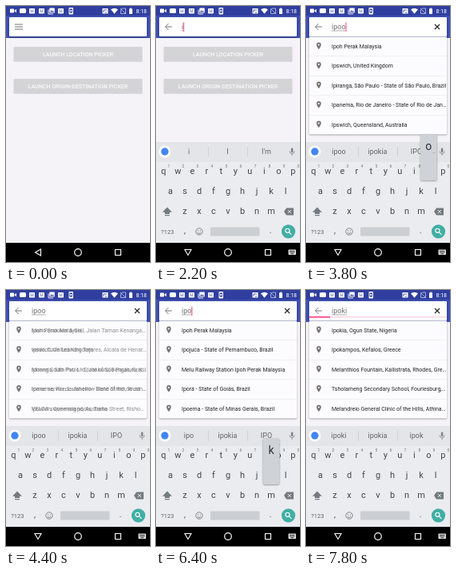
An HTML page with a canvas that plays this animation: 180 px wide and 320 px high, repeating every 8000 ms.

```html
<!DOCTYPE html>
<html lang="en">
<head>
<meta charset="utf-8">
<title>Location picker</title>
<style>
  html, body { margin: 0; width: 100%; height: 100%; overflow: hidden; background: #f5f3f7; }
  canvas { display: block; width: 180px; height: 320px; }
</style>
</head>
<body>
<canvas id="stage"></canvas>
<script>
const LOOP = 8000, TICK = 200;
const PINK = '#ff4081', INK = '#41474b', KEY = '#747b80', GREY = '#757575';
const canvas = document.getElementById('stage');
const ctx = canvas.getContext('2d');
const ratio = window.devicePixelRatio || 1;
canvas.width = 180 * ratio;
canvas.height = 320 * ratio;

const places = {
  ip: ['Ipoh Perak Malaysia', 'Ipswich, United Kingdom',
    'Ipiranga, São Paulo - State of São Paulo, Brazil',
    'Ipanema, Rio de Janeiro - State of Rio de Janeiro, Brazil', 'Ipswich, Queensland, Australia'],
  ipoo: ['Marlo Snooker & Grill, Jalan Taman Kenanga, Pluit',
    'veldo, Calle Leandro Tejares, Alcala de Henares, Spain',
    'Morvel South Pvt. Ltd., Jakkuru, Bengaluru, Karnataka',
    'lomar service, Larkhollow Bend Street, West Miami, FL',
    'VELDA swimming pools, Tamo Street, Rishon LeZion'],
  ipo: ['Ipoh Perak Malaysia', 'Ipojuca - State of Pernambuco, Brazil',
    'Melu Railway Station Ipoh Perak Malaysia', 'Iporá - State of Goiás, Brazil',
    'Ipoema - State of Minas Gerais, Brazil'],
  ipok: ['Ipokia, Ogun State, Nigeria', 'Ipokampos, Kefalos, Greece',
    'Melanthios Fountain, Kallistrata, Rhodes, Greece',
    'Tsholameng Secondary School, Fouriesburg, South Africa',
    'Melandreio General Clinic of the Hills, Athina, Greece']
};

// Each step changes part of the state from its time on.
const steps = [
  [0, { open: 0, keys: 0, drop: 0, text: '', words: ['and', 'I', 'please'], cursor: 0, clear: 0,
        popup: '', list: '', next: '', fade: 0, unfold: 0, search: -1 }],
  [800, { open: .5, cursor: 1 }],
  [1000, { open: 1, keys: .7, drop: 12.5 }],
  [1200, { keys: 1, drop: 0 }],
  [1800, { popup: 'i' }],
  [2000, { text: 'i', words: ['i', 'I', "I'm"] }],
  [2200, { popup: '' }],
  [2600, { cursor: 0, clear: 1 }],
  [3200, { text: 'ip', words: ['ip', 'IP', 'up'], popup: 'p', cursor: 1 }],
  [3400, { popup: '', list: 'ip', unfold: .6 }],
  [3600, { text: 'ipo', words: ['ipo', 'ipokia', 'IPO'], popup: 'o', unfold: 1 }],
  [3800, { text: 'ipoo', words: ['ipoo', 'ipokia', 'IPO'] }],
  [4000, { popup: '' }],
  [4400, { next: 'ipoo', fade: .5, cursor: 0 }],
  [4600, { list: 'ipoo', fade: 0, cursor: 1 }],
  [5000, { cursor: 0 }],
  [5400, { text: 'ipo', words: ['ipo', 'ipokia', 'IPO'], cursor: 1 }],
  [5800, { search: 5600, cursor: 0 }],
  [6000, { next: 'ipo', fade: .5 }],
  [6200, { list: 'ipo', fade: 0, search: -1, cursor: 1 }],
  [6400, { popup: 'k' }],
  [6600, { text: 'ipok', words: ['ipok', 'ipokia', 'ipo'] }],
  [6800, { popup: '' }],
  [7000, { search: 6800 }],
  [7200, { popup: 'i' }],
  [7400, { text: 'ipoki', words: ['ipoki', 'ipokia', 'ipok'] }],
  [7600, { popup: '', search: -1, next: 'ipok', fade: .5 }],
  [7800, { list: 'ipok', fade: 0, search: 7600, cursor: 0 }]
];
const stateAt = t => Object.assign({}, ...steps.filter(s => s[0] <= t).map(s => s[1]));

function rect(x, y, w, h, color, r = 0) {
  ctx.fillStyle = color;
  ctx.beginPath();
  ctx.roundRect(x, y, w, h, r);
  ctx.fill();
}
function disc(x, y, r, color) {
  ctx.fillStyle = color;
  ctx.beginPath();
  ctx.arc(x, y, r, 0, 7);
  ctx.fill();
}
function fill(d, color) {
  ctx.fillStyle = color;
  ctx.fill(new Path2D(d));
}
function line(d, color, w = 1) {
  ctx.strokeStyle = color;
  ctx.lineWidth = w;
  ctx.stroke(new Path2D(d));
}
function label(str, x, y, size, color, align = 'left', weight = 400) {
  ctx.font = `${weight} ${size}px Roboto, sans-serif`;
  ctx.fillStyle = color;
  ctx.textAlign = align;
  ctx.fillText(str, x, y);
}
function raised(blur, draw) {
  ctx.save();
  ctx.shadowColor = 'rgba(0,0,0,.4)';
  ctx.shadowBlur = blur * ratio;
  ctx.shadowOffsetY = .7 * ratio;
  draw();
  ctx.restore();
}
function clipped(x, y, w, h, draw) {
  ctx.save();
  ctx.beginPath();
  ctx.rect(x, y, w, h);
  ctx.clip();
  draw();
  ctx.restore();
}
function ellipsis(str, width) {
  if (ctx.measureText(str).width <= width) return str;
  while (ctx.measureText(str + '…').width > width) str = str.slice(0, -1);
  return str + '…';
}

function statusBar() {
  const blue = '#303f9f';
  rect(0, 0, 180, 12, blue);
  rect(5, 3.5, 5, 5, '#fff', .7);
  fill('M10 6l3-2.3v4.6z', '#fff');
  rect(17, 3, 8, 6, '#fff', 1.5);
  for (const x of [29, 41]) {
    rect(x, 3, 7, 6.5, '#fff', .7);
    line(`M${x + 1.5} 5h1.5m1 0h1.5M${x + 1.5} 7h4`, blue, .8);
  }
  line('M53 4.5v5.5h6', '#fff', .9);
  rect(54.3, 2.5, 6.5, 6, '#fff', .5);
  fill('M55 7.5l1.7-2.2 1.2 1.4 .9-1 1.4 1.8z', blue);
  rect(65, 3, 7, 6.5, '#fff', .7);
  line('M66.5 5h1.5m1 0h1.5M66.5 7h4', blue, .8);
  rect(78.5, 2, 5.5, 8.5, '#fff', .8);
  rect(79.5, 3.5, 3.5, 5, blue);
  rect(80.3, 5, 2, 2, '#fff');
  rect(120.5, 3, 7, 6.5, '#fff', .5);
  line('M122 8V5h4M124 8h2', blue, .8);
  fill('M131 4.3q4.5-3 9 0l-4.5 5.4z', '#fff');
  line('M143.5 9.5V5l2-2h4v6.5zM143 3l7 7', '#c5cae9', .8);
  rect(154, 3.2, 4, 6.8, '#fff', .5);
  rect(155.2, 2.4, 1.6, 1, '#fff');
  label('8:18', 176, 9, 7, '#fff', 'right');
}

function page() {
  rect(0, 0, 180, 320, '#f5f3f7');
  rect(0, 12, 180, 28, '#3f51b5');
  statusBar();
  ['LOCATION', 'ORIGIN-DESTINATION'].forEach((kind, i) => {
    rect(9.5, 51 + 40 * i, 161, 18.7, '#d4d4d6', 1);
    label(`LAUNCH ${kind} PICKER`, 90, 62.8 + 40 * i, 7, '#fafafa', 'center', 500);
  });
}

function menuIcon(k) {
  const mix = (a, b) => a + (b - a) * k;
  for (const side of [-1, 1])
    line(`M${mix(11, 11.6)} ${26 + side * mix(3, 0)}L${mix(21, 15.6)} ${26 + side * mix(3, 4)}`, GREY);
  line(`M${mix(11, 12)} 26H${mix(21, 19.8)}`, GREY);
}

function searchCard(s, t) {
  raised(2.5, () => rect(4, 14, 172, 24, '#fff', 1));
  menuIcon(s.open);
  if (!s.open) return;
  label(s.text || 'Search', 32, 29.2, 9, s.text ? '#727272' : '#828282');
  const end = 32 + (s.text ? ctx.measureText(s.text).width : 0);
  if (s.text) rect(32, 30.6, end - 32, .7, '#888');
  if (s.cursor) rect(end, 20.5, 1, 11.5, PINK);
  if (s.clear) line('M161 23l6 6m0-6l-6 6', '#222', 1.2);
  if (s.search >= 0) {
    const k = (t - s.search) / 200;
    const head = Math.min(176, 4 + 26 * k * k), tail = 4 + 34 * (k - 1) ** 2;
    rect(4, 33, 172, 1.6, '#ffd6e3');
    rect(tail, 33, head - tail, 1.6, PINK);
  }
}

function rows(name) {
  places[name].forEach((place, i) => {
    ctx.font = '400 7px Roboto, sans-serif';
    label(ellipsis(place, 143.6), 32, 52.7 + 24.5 * i, 7, '#222');
  });
}

function results(s) {
  if (!s.list) return;
  const height = 122 * s.unfold;
  raised(2, () => rect(4, 38.5, 172, height, '#fcfbfd', 1));
  clipped(4, 38, 172, height + .5, () => {
    rect(4, 38, 172, .6, '#dcdcdf');
    for (let i = 0; i < 5; i++) {
      const y = 50 + 24.5 * i;
      if (i) rect(4, y - 12, 172, .5, '#e6e6e9');
      fill(`M16 ${y - 4.4}a2.8 2.8 0 0 0-2.8 2.8c0 2.2 2.8 5.7 2.8 5.7s2.8-3.5 2.8-5.7a2.8 2.8 0 0 0-2.8-2.8z`, GREY);
      disc(16, y - 1.6, 1, '#fff');
    }
    ctx.globalAlpha = 1 - s.fade;
    rows(s.list);
    if (s.fade) {
      ctx.globalAlpha = s.fade;
      rows(s.next);
    }
  });
}

function navIcons(typing) {
  line(typing ? 'M36 304.5h8l-4 7z' : 'M43.5 304v8l-7-4z', '#fff', 1.1);
  line('M94.3 308a4.3 4.3 0 1 1-8.6 0a4.3 4.3 0 1 1 8.6 0z', '#fff', 1.2);
  line('M136.5 304.5h7v7h-7z', '#fff', 1.1);
  if (typing) {
    rect(165.5, 304.5, 9.5, 6.5, '#ddd', .7);
    line('M167 306.3h6.5M167 308h6.5', '#000', .7);
    line('M168.5 309.7h3.5', '#000', .7);
  }
}

const keyRows = [['qwertyuiop', 9.3, 210], ['asdfghjkl', 18, 235], ['zxcvbnm', 36, 260]];

function keys(s) {
  disc(11, 182, 7.5, '#fff');
  disc(11, 182, 4.7, '#4285f4');
  s.words.forEach((word, i) => label(word, 41 + 48.5 * i, 185, 9, '#5f6569', 'center'));
  for (const x of [65, 114]) rect(x, 176, .6, 12.5, '#c1c3c7');
  rect(168.8, 177.5, 2.6, 5.8, '#80868a', 1.3);
  line('M167 181.5a3.1 3.1 0 0 0 6.2 0M170.1 184.6v2.4', '#80868a', .8);

  for (const [letters, x, y] of keyRows)
    [...letters].forEach((c, i) => label(c, x + 18 * i, y, 11, INK, 'center'));
  for (let i = 0; i < 10; i++) label((i + 1) % 10, 16 + 18 * i, 202, 5, '#6d7479', 'center');

  fill('M14 251.5l6 6.2h-3v2.3h-6v-2.3h-3z', KEY);
  rect(11, 261, 6, 1.2, KEY);
  fill('M160 257l3-4.5h9v9h-9z', KEY);
  line('M164.8 255l4 4m0-4l-4 4', '#ebecf0', 1);
  label('?123', 14.3, 284.6, 7.5, '#5c6368', 'center');
  label(',', 36, 284, 10, INK, 'center');
  line('M58.2 282a4.2 4.2 0 1 1-8.4 0a4.2 4.2 0 1 1 8.4 0zM51.8 283a2.3 2 0 0 0 4.4 0', KEY, .9);
  disc(52.6, 280.9, .6, KEY);
  disc(55.4, 280.9, .6, KEY);
  rect(68, 276.5, 61.5, 11, '#cbced2', 1);
  label('.', 143, 284, 10, INK, 'center');
  disc(165.5, 281.8, 8.6, '#42aea4');
  line('M167 280.8a2.6 2.6 0 1 1-5.2 0a2.6 2.6 0 1 1 5.2 0zM166.4 282.8l3 3', '#fff', 1.1);
}

function keyPopup(letter) {
  const [letters, x0, base] = keyRows.find(r => r[0].includes(letter));
  const x = x0 + 18 * letters.indexOf(letter), top = base - 49.5;
  const left = Math.min(x - 10.3, 159);
  raised(2, () => rect(left, top, 20.6, 57.5, '#cfd3d7', 2));
  label(letter, left + 10.3, top + 19.5, 14, '#2b3135', 'center');
  if (base === 210) label('…', left + 17, top + 23, 5, '#5a6267', 'center');
}

// The keyboard slides up over the navigation bar while fading in.
function keyboard(s, draw) {
  ctx.save();
  ctx.globalAlpha = s.keys;
  ctx.translate(0, s.drop);
  draw(s);
  ctx.restore();
}
function keyboardBack() {
  rect(0, 170, 180, 25, '#e3e5e8');
  rect(0, 195, 180, 101, '#ebecf0');
}

function draw(t) {
  const s = stateAt(t);
  ctx.setTransform(ratio, 0, 0, ratio, 0, 0);
  page();
  searchCard(s, t);
  results(s);
  rect(0, 296, 180, 24, '#000');
  keyboard(s, keyboardBack);
  navIcons(s.keys);
  keyboard(s, keys);
  if (s.popup) keyPopup(s.popup);
}

function frame() {
  const t = performance.now() % LOOP;
  draw(Math.floor(t / TICK) * TICK);
  requestAnimationFrame(frame);
}
frame();
</script>
</body>
</html>
```
